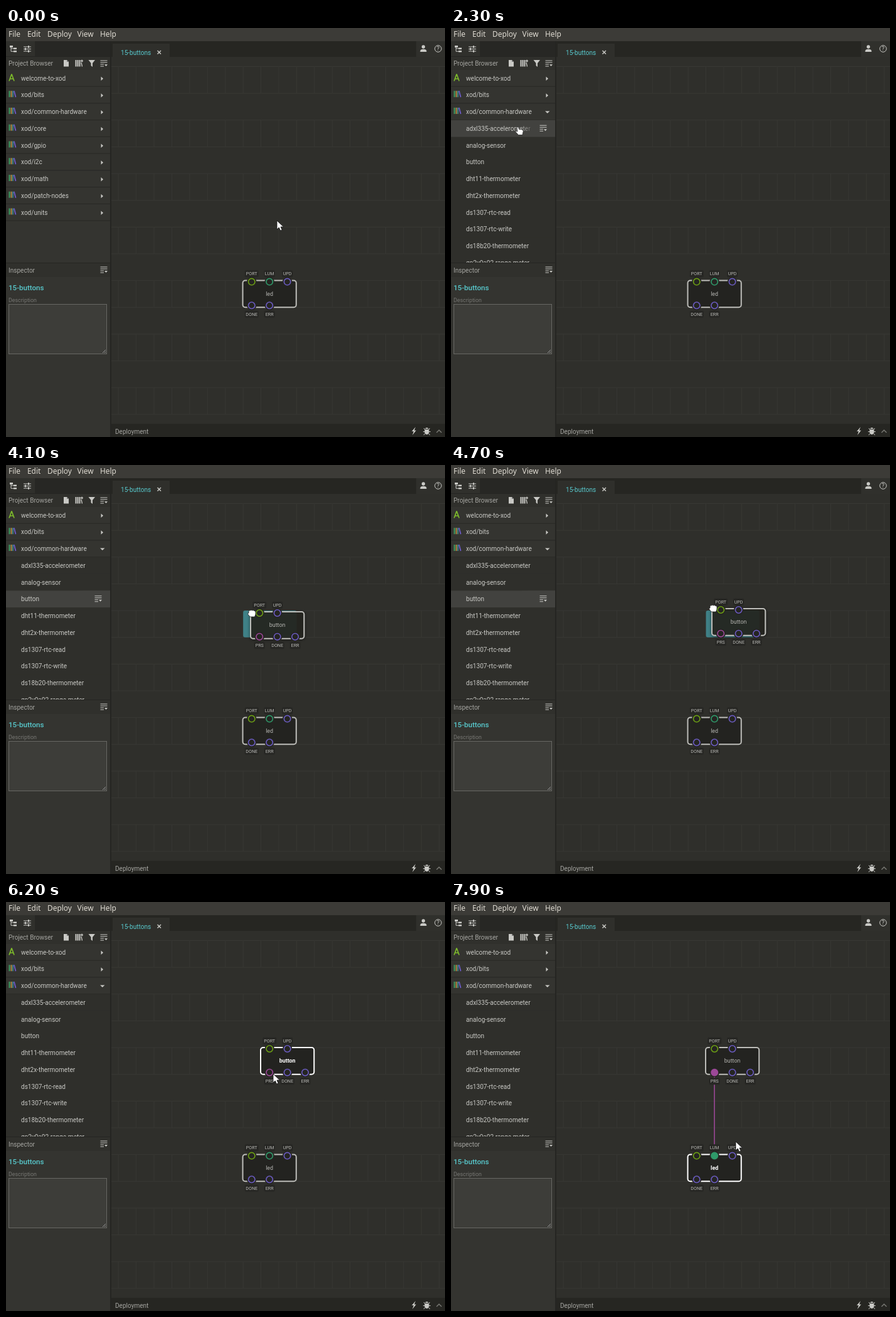
An HTML page that plays this animation: 700 px wide and 652 px high, repeating every 8000 ms.

```html
<!DOCTYPE html>
<html lang="en">
<head>
<meta charset="utf-8">
<title>Visual patching</title>
<style>
html, body { margin: 0; width: 100%; height: 100%; overflow: hidden; background: #2f2f2b; }
svg { display: block; width: 700px; height: 652px; font-family: Roboto, sans-serif; }
</style>
</head>
<body>
<svg viewBox="0 0 700 652">
  <defs>
    <clipPath id="list"><rect y="67" width="166" height="307"/></clipPath>
    <linearGradient id="fade"><stop offset="0" stop-color="#42423f" stop-opacity="0"/><stop offset=".45" stop-color="#42423f"/></linearGradient>
    <filter id="shadow" x="-20%" y="-30%" width="140%" height="160%"><feDropShadow dx="0" dy="1" stdDeviation="2.5" flood-opacity=".55"/></filter>
  </defs>
  <g id="backdrop"></g>
  <g id="live"></g>
</svg>
<script>
const LOOP = 8000, STEP = 100, ROW = 26.75, CELL = 28.42, SLOT = 42.65;
const GRID_X = 179.2, GRID_Y = 61.5;
const INK = '#c9c9c5', DIM = '#a5a5a1', CYAN = '#58c9cd';
const GREEN = '#6c9f14', TEAL = '#2f9a6a', VIOLET = '#6a5bc0', PURPLE = '#9c4898';

const rect = (x, y, w, h, fill, extra = '') =>
  `<rect x="${x}" y="${y}" width="${w}" height="${h}" fill="${fill}" ${extra}/>`;
const text = (x, y, s, size = 10.05, fill = INK, extra = '') =>
  `<text x="${x}" y="${y}" font-size="${size}" fill="${fill}" ${extra}>${s}</text>`;
const line = (d, stroke, width = 1, extra = '') =>
  `<path d="${d}" fill="none" stroke="${stroke}" stroke-width="${width}" ${extra}/>`;
const shape = (d, fill = INK, extra = '') => `<path d="${d}" fill="${fill}" ${extra}/>`;
const circle = (x, y, r, fill, extra = '') => `<circle cx="${x}" cy="${y}" r="${r}" fill="${fill}" ${extra}/>`;
const at = (x, y, body) => `<g transform="translate(${x} ${y})">${body}</g>`;
const rowY = i => 66.6 + i * ROW;

const menuIcon = (x, y) => at(x, y, line('M-5.5-4H5.5M-5.5-1H5.5M-5.5 2H0M-5.5 5H0', INK, 1.2) + shape('M1 2h5l-2.5 3z'));
const books = y => at(4, y,
  line('M1.5-5V5', '#3f9c60', 2) + line('M4.5-5V5', '#b58a42', 2) +
  line('M7-5V5', '#3d8f98', 1.6) + line('M8.8-5L11.5 5', '#6a58bd', 2));
const compass = y => at(9, y, line('M0-6L-4 5M0-6L4 5M-3 1.5H3', '#7fbd2b', 1.7));

function grid() {
  let d = '';
  for (let row = 0; row < 7; row++) {
    const y = GRID_Y + row * 2 * SLOT;
    d += `M168 ${y}H700M168 ${y + SLOT}H700`;
    for (let x = GRID_X; x < 700; x += CELL) d += `M${x} ${y}v${SLOT}`;
  }
  return line(d, '#383834');
}

function backdrop() {
  const menu = [['File', 4], ['Edit', 34], ['Deploy', 66], ['View', 113.5], ['Help', 150]];
  return rect(0, 0, 700, 652, '#2f2f2b') + grid() +
    // menu bar and tabs
    rect(0, 0, 700, 21, '#3c3b37') +
    menu.map(([s, x]) => text(x, 14, s, 11.9, '#dfdbd2', 'font-family="Noto Sans, sans-serif"')).join('') +
    rect(168, 21, 532, 25, '#262622') + rect(170, 25, 91, 21, '#2f2f2b') + rect(654, 21, 46, 25, '#30302c') +
    text(183, 42.5, '15-buttons', 10.05, CYAN) + line('M241.5 36l5.5 5.5m0-5.5l-5.5 5.5', INK, 1.5) +
    circle(665.5, 30, 2.7, INK) + shape('M660.5 38v-1.5q0-2.5 5-2.8 5 .3 5 2.8V38z') +
    circle(689, 33, 5.3, 'none', `stroke="${INK}"`) + text(689, 36.3, '?', 9, INK, 'text-anchor="middle"') +
    // sidebar
    rect(0, 21, 168, 631, '#252522') + rect(0, 21, 166, 24, '#272724') + rect(0, 21, 46, 24, '#30302c') +
    rect(0, 46, 166, 21, '#30302c') + rect(0, 67, 166, 307, '#343430') +
    shape('M6 28h5v3H6zM12 31.5h5v2.5h-5zM12 36h5v2.5h-5z') + line('M8 31v6.3h4M8 32.8h4', INK) +
    line('M28 30h12M28 33.5h12M28 37h12', INK, 1.2) + line('M36 28.3v3.4M31 31.8v3.4M36 35.3v3.4', INK, 2) +
    text(4, 60, 'Project Browser', 10.05, DIM) +
    shape('M92 51h5l3 3v7.5h-8z') + shape('M97 51v3h3z', '#777') +
    line('M111.5 51v10.5M114.5 51v10.5M117.5 51v10.5', INK, 2) + line('M120 55l1.5 6.5M119 52.5h4M121 50.5v4', INK, 1.3) +
    shape('M131.5 51h10.5l-4 5v6l-2.5-2v-4z') + menuIcon(156, 56) +
    // inspector header, deployment bar
    rect(0, 375, 166, 22, '#30302c') + text(4, 389.5, 'Inspector', 10.05, DIM) + menuIcon(156, 385) +
    rect(0, 397, 166, 255, '#343430') +
    rect(168, 631, 532, 21, '#262622') + text(174, 646.5, 'Deployment', 10.05, DIM) +
    shape('M653 636l-6 7h3l-2 6 6-7.500h-3z') +
    shape('M668 639q3-4 6 0zM667.500 640h7v5q-1 3-3.500 3t-3.500-3z') +
    line('M666 638l2 2m8-2l-2 2M665 643.500h12M666 649l2-2.500m8 2.500l-2-2.500', INK) +
    line('M686.500 645l4-4 4 4', '#777773', 1.5);
}

function browser(open, hovered) {
  const top = ['welcome-to-xod', 'xod/bits', 'xod/common-hardware'];
  const closed = ['xod/core', 'xod/gpio', 'xod/i2c', 'xod/math', 'xod/patch-nodes', 'xod/units'];
  const parts = ['adxl335-accelerometer', 'analog-sensor', 'button', 'dht11-thermometer', 'dht2x-thermometer',
    'ds1307-rtc-read', 'ds1307-rtc-write', 'ds18b20-thermometer', 'gp2y0a02-range-meter'];
  const rows = top.concat(open ? parts : closed).map((name, i) => {
    const y = rowY(i), mid = y + ROW / 2, child = open && i > 2, hot = child && i === hovered;
    let out = child ? rect(0, y, 166, ROW + .5, hot ? '#42423f' : '#2f2f2b') : rect(0, y + ROW - .8, 166, 1.2, '#292926');
    out += text(24, mid + 3.6, name);
    if (hot) out += rect(108, y, 58, ROW, 'url(#fade)') + menuIcon(147, mid - 1);
    if (!child) {
      out += i ? books(mid - 1.5) : compass(mid - .5);
      out += shape(open && i === 2 ? `M150 ${mid - 1}h7.500l-3.750 3.500z` : `M151.500 ${mid - 2.5}v6.500l3.500-3.250z`);
    }
    return out;
  });
  return `<g clip-path="url(#list)">${rows.join('')}</g>`;
}

function inspector(selected) {
  const title = s => text(4, 417.5, s, 11.6, CYAN, 'font-weight="500"');
  const field = (y, h) => rect(4.5, y, 156, h, '#3d3d39', 'stroke="#686864"');
  if (!selected) return title('15-buttons') + text(4, 436.5, 'Description', 8.9, '#777773') + field(440.5, 79) +
    line('M154 518l5-5M157 518l2-2', '#999');
  const pins = [['PORT', 'D0'], ['UPD', 'Continuously'], ['PRS', ''], ['DONE', ''], ['ERR', '']];
  return title('button') + text(4, 436.5, 'xod/common-hardware/button', 8.9, '#777773') +
    pins.map(([name, value], i) => {
      const y = 456 + i * 22;
      return text(8, y + 3, name, 8.9) + (value ? rect(62.5, y - 8, 98, 17, '#292926', 'stroke="#50504c"') + text(67, y + 3, value, 8.9) : '');
    }).join('') +
    text(4, 574, 'Label', 8.9, '#777773') + field(579.5, 18) + text(4, 612, 'Description', 8.9, '#777773') + field(616.5, 32);
}

function pin(x, y, label, color, labelY, { filled = [], halos = [] }) {
  const full = filled.includes(label);
  return rect(x - label.length * 2.5 - 1, labelY - 5.5, label.length * 5 + 2, 11, '#272724', 'rx="2"') +
    text(x, labelY + 2.6, label, 7.15, '#b9b9b5', 'text-anchor="middle"') +
    circle(x, y, 7.7, '#252522') +
    (halos.includes(label) ? circle(x, y, 13, color, 'opacity=".45"') : '') +
    circle(x, y, 5.2, full ? color : '#252522', `stroke="${color}" stroke-width="1.6"`);
}

function node(x, y, name, ins, outs, look = {}) {
  const { stroke = '#bdbdb9', bold = false, drag = false } = look;
  const pins = (list, py, ly) => list.map(([label, color], i) =>
    pin(x + CELL * (i + .5), py, label, color, ly, look)).join('');
  return rect(x, y, CELL * 3, SLOT, '#232320',
      `rx="4" stroke="${stroke}" stroke-width="2" ${drag ? 'fill-opacity=".86" filter="url(#shadow)"' : ''}`) +
    text(x + CELL * 1.5, y + 24.2, name, 8.9, bold ? '#fff' : '#b5b5b1', `text-anchor="middle" ${bold ? 'font-weight="700"' : ''}`) +
    pins(ins, y + 2, y - 10.800) + pins(outs, y + SLOT - 3, y + SLOT + 11);
}
const button = (x, y, look) => node(x, y, 'button', [['PORT', GREEN], ['UPD', VIOLET]],
  [['PRS', PURPLE], ['DONE', VIOLET], ['ERR', VIOLET]], look);
const led = look => node(377.5, 402.6, 'led', [['PORT', GREEN], ['LUM', TEAL], ['UPD', VIOLET]],
  [['DONE', VIOLET], ['ERR', VIOLET]], look);

// Keyframes: [time, x, y]; a lone time holds the previous place until then.
const pointerPath = [[600, 432, 307], [1000, 181, 166], [1100], [1300, 152, 145], [1400], [1600, 127, 127], [2200],
  [2300, 102, 157], [2600, 42, 203], [2700], [3000, 30, 207], [3100], [3200, 50, 211], [3600, 273, 242],
  [3800, 325, 240], [4000, 361, 235], [4100, 385, 230], [4500, 409, 222], [4600], [4700, 411, 222],
  [5500, 446, 286], [6100], [6200, 426, 274], [6600, 420, 271], [6800], [7500, 420, 401], [7700], [7900, 454, 382]];
const dragPath = [[3400, 182, 234], [3600, 289, 247], [4000, 366, 239], [4100, 390, 234], [4500, 415, 229], [4700, 416, 229]];

function follow(path, t) {
  let [t0, x0, y0] = path[0];
  for (const [t1, x1 = x0, y1 = y0] of path) {
    if (t <= t1) {
      const k = t1 > t0 ? Math.max(0, (t - t0) / (t1 - t0)) : 0;
      return [x0 + (x1 - x0) * k, y0 + (y1 - y0) * k];
    }
    [t0, x0, y0] = [t1, x1, y1];
  }
  return [x0, y0];
}

const cursors = {
  arrow: shape('M0 0V14L3.300 11 5.500 16 8.200 15 6 10H10.500Z', '#fff', 'stroke="#111" stroke-width=".8"'),
  hand: shape('M3 1.500q1.500-1.500 2.500 0l1 3q4-.500 6 1 1.500 2 0 5l-.500 3H5.500L1 8.500q.500-2 3-.500z', '#fff', 'stroke="#222" stroke-width=".8"'),
  fist: shape('M2 3q1-2 2.500-1 1.500-2 3 0 1.500-1.500 3 .500 2-.500 2.500 1.500v4l-1.500 4H4L.500 7.500Q.500 6 2 6z', '#fff', 'stroke="#222" stroke-width=".8"')
};

function scene(t) {
  const [px, py] = follow(pointerPath, t);
  const open = t >= 1800, dragging = t >= 2800 && t < 4800, selected = t >= 4800 && t < 5900;
  const linking = t >= 6900 && t < 7800, linked = t >= 7800;
  const hovered = dragging ? 5 : t < 4800 ? Math.floor((py + 2 - 66.6) / ROW) : -1;
  const bright = { stroke: '#fff', bold: true };
  let out = browser(open, hovered) + inspector(selected);

  if (linking || linked) out += line(`M420 272L${linked ? '420 404' : `${px} ${py}`}`, PURPLE, 1.6);
  out += led({ ...(linked ? bright : {}), filled: linked ? ['LUM'] : [], halos: linking ? ['LUM', 'UPD'] : [] });

  if (t >= 3400 && t < 4800) {
    const [x, y] = follow(dragPath, t);
    const slot = GRID_X + CELL * Math.floor((x - GRID_X) / CELL);
    out += rect(slot, 232, CELL * 3, SLOT, '#3f8187', 'rx="3"') + button(x, y, { drag: true });
  } else if (t >= 4800) {
    const look = selected ? { stroke: CYAN } : linked ? {} : bright;
    out += button(406, 232, { ...look, filled: linking || linked ? ['PRS'] : [], halos: linking ? ['PRS'] : [] });
  }
  const cursor = dragging ? 'fist' : t >= 1300 && t < 2800 ? 'hand' : 'arrow';
  return out + at(px, py, cursors[cursor]);
}

const live = document.getElementById('live');
document.getElementById('backdrop').innerHTML = backdrop();
let shown = -1;
function tick(now) {
  const t = Math.floor(now % LOOP / STEP) * STEP;
  if (t !== shown) live.innerHTML = scene(shown = t);
  requestAnimationFrame(tick);
}
tick(performance.now());
</script>
</body>
</html>
```
